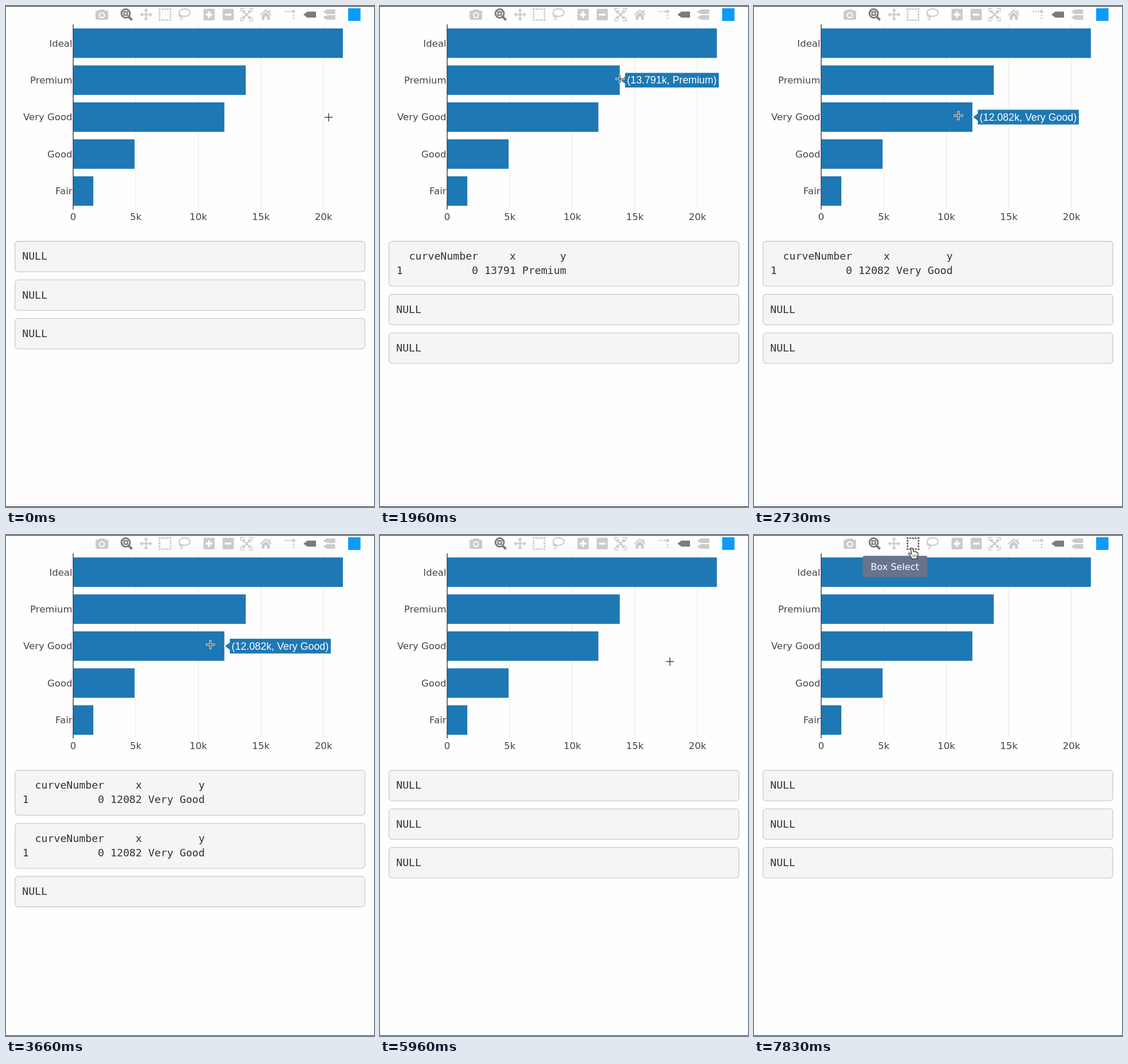
These frames come from a looping animation (641x873 px, 8000 ms). An HTML page with a canvas:

```html
<!DOCTYPE html>
<html lang="en">
<head>
<meta charset="utf-8">
<title>Bar chart hover events</title>
<style>
html, body { margin: 0; width: 100%; height: 100%; overflow: hidden; background: #fefefe; }
canvas { display: block; }
</style>
</head>
<body>
<canvas id="stage" width="641" height="873"></canvas>
<script>
const ctx = document.getElementById('stage').getContext('2d');
const LOOP = 8000, BLUE = '#1e78b4', IDLE = '#cbcbcb', ACTIVE = '#7b7b7b', PAPER = '#fefefe';
const SANS = '"DejaVu Sans", Verdana, sans-serif';
const MONO = '18.2px "DejaVu Sans Mono", Menlo, monospace';
const LABEL = '17.8px "Liberation Sans", Arial, sans-serif';

const bars = [['Ideal', 21551], ['Premium', 13791], ['Very Good', 12082], ['Good', 4906], ['Fair', 1610]];
const xOf = v => 117 + v * 0.0218;
const yOf = i => 64.8 + i * 64.4;

// start, end, number of steps, destination
const origin = [562, 194];
const moves = [
  [600, 1030, 14, 417.5, 125.3],
  [1960, 2260, 10, 448, 212.5],
  [2500, 2730, 8, 356, 191],
  [4500, 4700, 7, 505, 220.5],
  [6730, 6930, 7, 449, 118],
  [7160, 7360, 7, 291, 40.3],
  [7560, 7830, 7, 275, 23]
];
// from, to, bar index
const hovers = [[970, 2000, 1], [2630, 4560, 2], [7260, 7590, 0]];
const hoverRows = [[1030, 2200, 1], [2730, 4700, 2], [7360, 7790, 0]];
const clickRows = [[3660, 5960, 2]];

const activeAt = (list, t) => {
  const hit = list.find(([a, b]) => t >= a && t < b);
  return hit ? hit[2] : -1;
};
const ease = k => k < 0.5 ? 2 * k * k : 1 - 2 * (1 - k) * (1 - k);

function pointer(t) {
  let [x, y] = origin;
  for (const [a, b, n, tx, ty] of moves) {
    if (t < a) break;
    const step = Math.floor((t - a) / (b - a) * (n - 1) + 0.2) + 1;
    const k = ease(Math.min(1, step / n));
    x += (tx - x) * k;
    y += (ty - y) * k;
  }
  return [x, y];
}

function rect(x, y, w, h, color) {
  ctx.fillStyle = color;
  ctx.fillRect(x, y, w, h);
}
function poly(points, fill, stroke, width = 1) {
  ctx.beginPath();
  points.forEach(([x, y]) => ctx.lineTo(x, y));
  ctx.closePath();
  if (fill) { ctx.fillStyle = fill; ctx.fill(); }
  if (stroke) { ctx.strokeStyle = stroke; ctx.lineWidth = width; ctx.stroke(); }
}
function line(x1, y1, x2, y2, color, width) {
  ctx.beginPath();
  ctx.moveTo(x1, y1);
  ctx.lineTo(x2, y2);
  ctx.strokeStyle = color;
  ctx.lineWidth = width;
  ctx.stroke();
}
function oval(x, y, rx, ry, color, width) {
  ctx.beginPath();
  ctx.ellipse(x, y, rx, ry, 0, 0, Math.PI * 2);
  if (width) { ctx.strokeStyle = color; ctx.lineWidth = width; ctx.stroke(); }
  else { ctx.fillStyle = color; ctx.fill(); }
}
function round(x, y, w, h, r, fill, stroke) {
  ctx.beginPath();
  ctx.roundRect(x, y, w, h, r);
  ctx.fillStyle = fill;
  ctx.fill();
  if (stroke) { ctx.strokeStyle = stroke; ctx.lineWidth = 1.3; ctx.stroke(); }
}
function text(s, x, y, font, color, align = 'left') {
  ctx.font = font;
  ctx.fillStyle = color;
  ctx.textAlign = align;
  ctx.fillText(s, x, y);
}

function arrows(cx, cy, turn) {
  ctx.save();
  ctx.translate(cx, cy);
  ctx.rotate(turn);
  for (let i = 0; i < 4; i++) {
    line(0, 0, 0, -7, IDLE, 2.4);
    poly([[0, -11], [4, -6.5], [-4, -6.5]], IDLE);
    ctx.rotate(Math.PI / 2);
  }
  ctx.restore();
}
function tag(x, y, w, h, color) {
  poly([[x, y], [x + 7, y - h / 2], [x + w, y - h / 2], [x + w, y + h / 2], [x + 7, y + h / 2]], color);
}

function modebar(boxHover) {
  // camera
  round(156, 8, 22, 16, 2.5, IDLE);
  rect(162, 6, 10, 4, IDLE);
  oval(167, 16, 5.3, 5.3, PAPER);
  oval(167, 16, 3.2, 3.2, IDLE);
  // zoom
  oval(208.5, 13, 7.4, 7.4, ACTIVE, 3);
  line(214, 19, 219.5, 24.5, ACTIVE, 4);
  rect(204.5, 9, 8, 8, ACTIVE);
  rect(206.7, 11.2, 3.6, 3.6, PAPER);
  // pan
  arrows(244, 15, 0);
  // box select
  const dots = boxHover ? '#6a6a6a' : IDLE;
  for (let i = 0; i < 5; i++) {
    const d = i * 4.75;
    rect(266 + d, 4, 3, 3, dots);
    rect(266 + d, 23, 3, 3, dots);
    rect(266, 4 + d, 3, 3, dots);
    rect(285, 4 + d, 3, 3, dots);
  }
  // lasso
  oval(311, 11.5, 9.6, 6.6, IDLE, 2);
  ctx.beginPath();
  ctx.moveTo(302, 15);
  ctx.bezierCurveTo(301, 21, 308, 17, 307, 21);
  ctx.quadraticCurveTo(306, 24, 303, 24);
  ctx.stroke();
  // zoom in, zoom out
  for (const x of [344, 377.3]) {
    round(x, 5, 19.5, 20, 1.5, IDLE);
    rect(x + 4, 13.3, 11.5, 3.4, PAPER);
  }
  rect(352, 9.3, 3.4, 11.5, PAPER);
  // autoscale
  arrows(419, 15, Math.PI / 4);
  for (const sx of [-1, 1]) for (const sy of [-1, 1]) {
    const x = 419 + sx * 10, y = 15 + sy * 10;
    line(x, y + sy * 0.8, x - sx * 6, y + sy * 0.8, IDLE, 1.6);
    line(x, y + sy * 1.6, x, y - sy * 5, IDLE, 1.6);
  }
  // home
  line(443, 16, 452.5, 7, IDLE, 2.4);
  line(452.5, 7, 462, 16, IDLE, 2.4);
  rect(457.5, 7, 2.8, 6, IDLE);
  poly([[445.5, 17], [452.5, 10.5], [459.5, 17], [459.5, 24], [454.7, 24], [454.7, 18.5], [450.3, 18.5], [450.3, 24], [445.5, 24]], IDLE);
  // spike lines
  for (let i = 0; i < 3; i++) {
    rect(485.5 + i * 4.5, 8.3, 2.6, 2.6, IDLE);
    if (i) rect(499.6, 10.5 + i * 4.7, 2.6, 2.6, IDLE);
  }
  oval(500.9, 9.6, 2.8, 2.8, IDLE);
  // hover modes
  tag(518, 15, 22, 10.5, ACTIVE);
  tag(552, 10, 21.5, 8, IDLE);
  tag(552, 20, 21.5, 8, IDLE);
  rect(596, 4, 21.5, 22, '#0c9bfb');
}

function chart() {
  for (let i = 1; i < 5; i++) line(xOf(i * 5000), 32, xOf(i * 5000), 354, '#ececec', 1.4);
  bars.forEach(([name, v], i) => {
    rect(117, yOf(i) - 25.7, xOf(v) - 117, 51.4, BLUE);
    text(name, 115.5, yOf(i) + 5.7, '16.5px ' + SANS, '#444', 'right');
  });
  line(117, 32, 117, 354.5, '#444', 1.5);
  for (let i = 0; i < 5; i++) {
    text(i ? i * 5 + 'k' : '0', xOf(i * 5000), 372.7, '16.5px ' + SANS, '#444', 'center');
  }
}

function hoverLabel(i) {
  const [name, v] = bars[i];
  const s = `(${v / 1000}k, ${name})`;
  ctx.font = LABEL;
  const w = ctx.measureText(s).width + 8.4, x = xOf(v), y = yOf(i);
  const dir = x + w + 9 > 640 ? -1 : 1;
  const near = x + dir * 8.7, far = near + dir * w;
  poly([[x, y], [near, y - 6.5], [near, y - 13.5], [far, y - 13.5],
        [far, y + 13.5], [near, y + 13.5], [near, y + 6.5]], BLUE, '#fff', 1.4);
  text(s, Math.min(near, far) + 4, y + 6.2, LABEL, '#fff');
}

function panel(y, i) {
  const h = i < 0 ? 53.2 : 78.4;
  round(15.7, y, 609.5, h, 5.5, '#f5f5f5', '#cbcbcb');
  if (i < 0) {
    text('NULL', 28.2, y + 32.3, MONO, '#333');
  } else {
    const [name, v] = bars[i];
    text('  curveNumber     x ' + 'y'.padStart(name.length), 28.7, y + 32.3, MONO, '#333');
    text('1           0 ' + v + ' ' + name, 28.7, y + 57.3, MONO, '#333');
  }
  return y + h + 14;
}

function boxTip() {
  poly([[277, 30], [283, 37], [271, 37]], '#69738d');
  round(189.3, 36.3, 112.5, 37.2, 3, '#69738d');
  text('Box Select', 245.4, 61, '16px ' + SANS, '#fff', 'center');
}

function cross(x, y) {
  for (const [r, color, width] of [[8, 'rgba(255,255,255,.85)', 3.6], [7.2, '#3c3c3c', 1.4]]) {
    line(x - r, y, x + r, y, color, width);
    line(x, y - r, x, y + r, color, width);
  }
}

function hand(x, y) {
  ctx.save();
  ctx.translate(x, y);
  ctx.beginPath();
  ctx.moveTo(-2, 0.5);
  ctx.quadraticCurveTo(0, -1.5, 1.5, 1);
  ctx.lineTo(3, 6);
  ctx.quadraticCurveTo(5, 4.5, 6, 6.5);
  ctx.quadraticCurveTo(8, 5.5, 8.5, 7.5);
  ctx.quadraticCurveTo(10.5, 7, 10.7, 9.5);
  ctx.quadraticCurveTo(11, 13, 9, 15.5);
  ctx.lineTo(9, 18.5);
  ctx.lineTo(0.5, 18.5);
  ctx.quadraticCurveTo(-1, 15, -5.5, 10.5);
  ctx.quadraticCurveTo(-6, 8, -3.5, 8.5);
  ctx.lineTo(-0.8, 10.5);
  ctx.closePath();
  ctx.fillStyle = '#fff';
  ctx.fill();
  ctx.lineJoin = 'round';
  ctx.strokeStyle = '#444';
  ctx.lineWidth = 1.5;
  ctx.stroke();
  for (const dx of [2, 4.5, 7]) line(dx, 11.5, dx, 15.5, '#555', 1);
  ctx.restore();
}

function draw(t) {
  const [x, y] = pointer(t);
  const onBar = activeAt(hovers, t);
  const onIcon = y < 28;
  rect(0, 0, 641, 873, PAPER);
  modebar(onIcon);
  chart();
  if (onBar >= 0) hoverLabel(onBar);
  let top = 410;
  for (const list of [hoverRows, clickRows, []]) top = panel(top, activeAt(list, t));
  if (onIcon) boxTip();
  (y < 32 ? hand : cross)(x, y);
  rect(0, 0, 641, 1, '#2a2a2a');
  rect(0, 872, 641, 1, '#2a2a2a');
}

let start;
function frame(now) {
  start ??= now;
  draw((now - start) % LOOP);
  requestAnimationFrame(frame);
}
draw(0);
requestAnimationFrame(frame);
</script>
</body>
</html>
```
